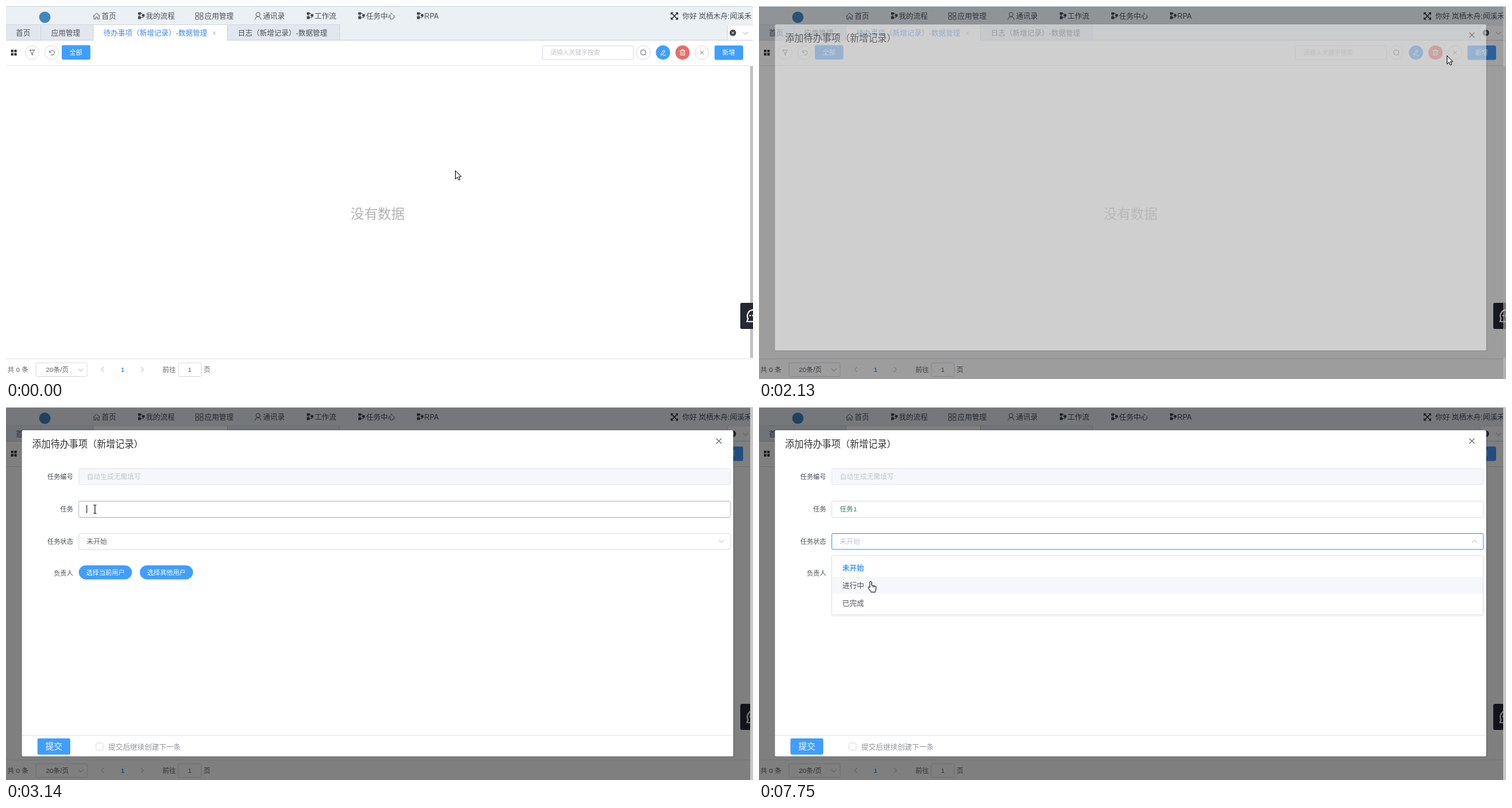
Recreate the animation shown at these times as an HTML page. Size 1058 px wide and 529 px high, loop 8 s.

```html
<!DOCTYPE html>
<html lang="zh-CN">
<head>
<meta charset="utf-8">
<title>待办事项</title>
<style>
html, body { margin: 0; width: 100%; height: 100%; overflow: hidden; background: #fff }
svg { display: block; width: 100%; height: 100% }
text { font: 10.25px "Liberation Sans", "Noto Sans CJK SC", "Noto Sans CJK", sans-serif; fill: #4a4f58; white-space: pre }
.s9 text { font-size: 9.1px }
.s95 text { font-size: 9.55px; fill: #606266 }
.line { fill: none; stroke: #606266; stroke-width: .9 }
.box { fill: #fff; stroke: #dcdfe6 }
.blue { fill: #409eff }
text.white { fill: #fff }
text.pale { fill: #c0c4cc }
.end { text-anchor: end }
</style>
</head>
<body>
<svg viewBox="0 0 1058 529">
<defs>
  <g id="flow" fill="#40454e">
    <path d="M0 9h4v3.4H0zM0 14.4h4v4H0zM5.5 11.5h3.8v3.6H5.5z"/>
    <path class="line" d="M2 11v5M4 10.5h2M4 16.500h3.500v-2"/>
  </g>
  <path id="cross" class="line" d="M-3.200-3.200 3.200 3.200M3.200-3.200-3.200 3.200"/>
  <path id="down" fill="none" stroke="#a8abb2" stroke-width=".9" d="M-3.500-1.700 0 1.700 3.500-1.700"/>
  <g id="arrow"><path d="M.5.500v11.800l2.700-2.500 1.900 4.100 2-.9-1.900-4h3.600z" fill="#fff" stroke="#000" stroke-width=".9"/></g>
  <g id="beam"><path d="M-2-6h1.500l.5.600.5-.6H2M0-5.400V5.400M-2 6h1.500L0 5.400l.5.600H2" fill="none" stroke="#000"/></g>
  <g id="hand"><path d="M-1 1Q.3-.8 1.600 1v5l5 1q1.600.5 1.300 2.500l-1.200 6H.8L-3.400 9.500q0-2 1.500-1.200l.9.900z" fill="#fff" stroke="#000" stroke-width=".9"/><path d="M3.700 6.500v2.500M5.800 7v2" stroke="#000" stroke-width=".7"/></g>
</defs>

<!-- header -->
<path d="M0 0h1058v49H0z" fill="#ebf0f5"/>
<path d="M0 .5h1058M0 26.500h473" stroke="#d5dbe2"/>
<circle cx="55" cy="16" r="8" fill="#3f87bd"/>
<path class="line" d="M123.500 14.500 128.300 10l4.800 4.500M124.700 13.500v5.200h2.300v-3h2.600v3h2.300v-5.200"/>
<use href="#flow" x="187"/><use href="#flow" x="426"/><use href="#flow" x="499"/><use href="#flow" x="582"/>
<path class="line" d="M268.700 9.700h4v4h-4zM274.900 9.700h4v4h-4zM268.700 15h4v4h-4zM274.900 15h4v4h-4z" stroke-linejoin="round"/>
<g class="line"><circle cx="357" cy="12" r="2.900"/><path d="M352.500 19.500q.5-4 4.500-4.600 4 .6 4.500 4.600"/></g>
<text x="135.500" y="18">首页</text>
<text x="198" y="18">我的流程</text>
<text x="281.300" y="18">应用管理</text>
<text x="364" y="18">通讯录</text>
<text x="437" y="18">工作流</text>
<text x="510" y="18">任务中心</text>
<text x="592.500" y="18">RPA</text>
<path d="M942.500 10l8.500 8.500m0-8.500-8.500 8.500" stroke="#303133" stroke-width="1.300"/>
<path d="M941.500 9h4l-4 4zM952 9h-4l4 4zM941.500 19.500h4l-4-4zM952 19.500h-4l4-4z" fill="#303133"/>
<text x="958" y="17.500">你好 岚栖木舟:闻溪禾</text>

<!-- tabs -->
<path d="M0 27h472v21H0z" fill="#e2e7ef"/>
<path d="M0 48.500h1058M49.500 27v21M123.500 27v21M313.500 27v21M472.500 27v21" stroke="#d0d7e0"/>
<path d="M124 27h189v22H124zM1021 28h37v20h-37z" fill="#fff"/>
<path d="M1021.500 28v20" stroke="#d0d7e0"/>
<text x="14" y="42">首页</text>
<text x="64" y="42">应用管理</text>
<text x="138" y="42" style="fill:#3b86f0">待办事项（新增记录）-数据管理</text>
<text x="328.500" y="42">日志（新增记录）-数据管理</text>
<use href="#cross" transform="translate(295 38.500) scale(.7)" opacity=".7"/>
<circle cx="1029.500" cy="38" r="4.600" fill="#40454e"/>
<path d="M1028 36.500l3 3m0-3-3 3" stroke="#fff"/>
<use href="#down" x="1047.500" y="38.500"/>

<!-- toolbar -->
<path d="M0 49h1058v480H0z" fill="#fff"/>
<path d="M0 84.500h1054M0 500.500h1058" stroke="#e4e7ed"/>
<path d="M7 62h3.500v3.500H7zM11.700 62h3.500v3.500h-3.500zM7 66.700h3.500v3.500H7zM11.700 66.700h3.500v3.500h-3.500z" fill="#303133"/>
<g class="box">
  <circle cx="37" cy="66" r="9.800"/><circle cx="64.700" cy="66" r="9.800"/>
  <circle cx="902.700" cy="66" r="9.800"/><circle cx="985.700" cy="66" r="9.800"/>
  <rect x="759.500" y="56.500" width="129" height="19.500" rx="2"/>
</g>
<path class="line" d="M33.500 62.500h7l-2.700 3.700v3.500l-1.600-1v-2.500zM61.800 63.500v2.300h2.300M62 65.500a3.300 3.300 0 1 1 1.200 3.300M905.200 68.500l1.200 1.200"/>
<circle class="line" cx="902.500" cy="65.800" r="3.700"/>
<use href="#cross" transform="translate(985.700 66) scale(.8)"/>
<circle class="blue" cx="930.500" cy="66" r="10.200"/>
<circle cx="958.200" cy="66" r="10.200" fill="#ea6c68"/>
<path d="M928 67.500l3.500-5 1.800 1.300-3.400 4.900-2.200.8zM930.500 69.800h4M954.300 63.500h7.800M955.300 63.500v6h5.800v-6M956.800 63.500v-1.500h2.800v1.500M957.200 65.500v2.500M959.200 65.500v2.500" fill="none" stroke="#fff" stroke-width=".9"/>
<rect class="blue" x="79" y="55.500" width="40.500" height="20.500" rx="2"/>
<rect id="add" x="1003.500" y="56" width="40.500" height="20.500" rx="2"/>
<g class="s9">
  <text class="white" x="90" y="69">全部</text>
  <text class="white" x="1014.500" y="69.400">新增</text>
  <text class="pale" x="771" y="69.200" style="font-size:8.800px">请输入关键字搜索</text>
</g>
<text x="488" y="301.500" style="font-size:19.200px;fill:#b2b2b2">没有数据</text>
<path d="M1054 85h4v414h-4z" fill="#c1c1c1"/>

<!-- pagination -->
<g class="box">
  <rect x="42.500" y="506" width="72.500" height="19.500" rx="2"/>
  <rect x="244" y="506" width="32.500" height="19.500" rx="2"/>
</g>
<g class="s95">
  <text x="2" y="519">共 0 条</text>
  <text x="56.500" y="519">20条/页</text>
  <text x="162.500" y="519" style="fill:#409eff;font-weight:bold">1</text>
  <text x="221.500" y="519.300">前往</text>
  <text x="257.500" y="519.300">1</text>
  <text x="280" y="519.300">页</text>
</g>
<use href="#down" x="106" y="516"/>
<use href="#down" transform="translate(137 515.500) rotate(90)"/>
<use href="#down" transform="translate(193 515.500) rotate(-90)"/>

<!-- chat button -->
<path d="M1058 421h-16q-2 0-2 2v33q0 2 2 2h16z" fill="#262833"/>
<path d="M1058 431a8.500 8.500 0 0 0-7 12.500l-1.500 4 8.500.2" fill="none" stroke="#fff" stroke-width="1.800"/>
<circle cx="1054" cy="439" r="1.200" fill="#fff"/><circle cx="1057.800" cy="439" r="1.200" fill="#fff"/>

<rect id="mask" y="1" width="1058" height="528"/>
<path id="strip" d="M1054 1h4v528h-4z" fill="#c8c8c8"/>

<g id="dialog">
  <rect x="21.500" y="32.500" width="1010" height="464.500" rx="2" opacity=".12"/>
  <rect x="22.500" y="33" width="1007.500" height="462.500" rx="1.500" fill="#fff"/>
  <text x="37" y="57" style="font-size:13.100px;fill:#303133">添加待办事项（新增记录）</text>
  <use href="#cross" transform="translate(1009.700 48.300) scale(1.150)"/>
  <circle id="spinner" cx="526.500" cy="280" r="12.300" fill="none" stroke="#409eff" stroke-width="1.300" stroke-linecap="round"/>
  <g id="form">
    <g class="s9 end">
      <text x="95" y="101.700">任务编号</text>
      <text x="95" y="147.500">任务</text>
      <text x="95" y="193.500">任务状态</text>
      <text x="95" y="239">负责人</text>
    </g>
    <g class="box">
      <rect x="103" y="87.500" width="923" height="22.500" rx="2" style="fill:#f5f7fa;stroke:#e4e7ed"/>
      <rect id="taskBox" x="103" y="133.500" width="923" height="23" rx="2"/>
      <rect id="stateBox" x="103" y="179.500" width="923" height="22.500" rx="2"/>
      <rect x="127.500" y="476.500" width="10" height="10" rx="1"/>
    </g>
    <g class="s95">
      <text class="pale" x="114.500" y="102">自动生成无需填写</text>
      <text id="task" x="114.300" y="148"/>
      <text id="state" x="114.300" y="194">未开始</text>
    </g>
    <path id="caret" d="M0 139v11.500" stroke="#303133"/>
    <use id="chevron" href="#down"/>
    <g class="blue">
      <rect x="103" y="224.500" width="75.500" height="20" rx="10"/>
      <rect x="189.500" y="224.500" width="75.500" height="20" rx="10"/>
      <rect x="44.500" y="470" width="46.500" height="23" rx="2"/>
    </g>
    <g class="s9">
      <text class="white" x="113.500" y="237.700">选择当前用户</text>
      <text class="white" x="200" y="237.700">选择其他用户</text>
      <text class="white" x="55.800" y="486.200" style="font-size:12px">提交</text>
    </g>
    <path d="M23 465.500h1007" stroke="#e4e7ed"/>
    <text x="145" y="485.500" style="fill:#909399">提交后继续创建下一条</text>
    <g id="menu">
      <rect x="102" y="210" width="925" height="87" rx="3" opacity=".05"/>
      <rect x="103" y="210.500" width="922.500" height="84" rx="2" class="box" style="stroke:#e4e7ed"/>
      <rect id="hover" x="103.500" width="921.500" height="24.800" fill="#f5f7fa"/>
      <text x="118" y="232" style="fill:#409eff;font-weight:bold">未开始</text>
      <text x="118" y="256.800">进行中</text>
      <text x="118" y="281.700">已完成</text>
    </g>
    <g id="ime">
      <rect id="imeBox" class="box" x="116.500" y="157.500" height="33"/>
      <text id="pinyin" x="120" y="169.500"/>
      <text id="words" x="120" y="186" style="font-size:13.500px"/>
    </g>
  </g>
</g>
<use id="cursor"/>
</svg>
<script>
const LOOP = 8000, STEP = 78;
const path = [ // time, x, y
  [110, 636, 233], [330, 622, 230], [650, 622, 230], [1480, 1015, 79], [1570, 1018, 66], [1650, 1018, 68],
  [1900, 1018, 68], [1970, 997, 73], [2055, 997, 73], [2208, 950, 67], [2750, 76, 127], [2985, 126, 145],
  [6500, 126, 145], [6960, 166, 187], [7200, 166, 187], [7745, 158, 247]
];
const cursors = [[0, 'arrow'], [1540, 'hand'], [1950, 'arrow'], [2850, 'beam'], [6640, 'arrow'], [6800, 'hand']];
const taskBorder = [[0, '#dcdfe6'], [2900, '#b4bccc'], [3210, '#409eff'], [7100, '#dcdfe6']];
const stateBorder = [[0, '#dcdfe6'], [6800, '#c0c4cc'], [7100, '#409eff']];
const typing = [ // time, text, right edge and words of the candidate list
  [0, ''],
  [3680, 'r', 465, '人 如 让 日 入 任 认 热'],
  [3750, 're', 465, '热 人 任 认 惹 仍 忍 仁'],
  [3980, 'reb', 577, '热播 热爆 热拔 人本 人邦 任办 认不 热表'],
  [4380, 're', 488, '热 人 任 认 惹 仍 忍 仁'],
  [4630, 'r', 488, '人 如 让 日 入 任 认 热'],
  [4720, 'ren', 465, '人 任 认 仁 忍 仍 刃 韧'],
  [4860, 'renw', 587, '任务 人物 认为 人为 人文 任务是 人物的'],
  [5080, 'renwu', 523, '任务 人物 人无 认无 任务是 人物的'],
  [5310, '任务'],
  [6020, '任务1']
];

const $ = id => document.getElementById(id);
const set = (id, attrs) => { for (const k in attrs) $(id).setAttribute(k, attrs[k]); };
const show = (id, on) => set(id, { visibility: on ? 'inherit' : 'hidden' });
const clamp = x => Math.min(1, Math.max(0, x));
const at = (list, t) => list.findLast(e => e[0] <= t) || list[0];

// CSS "ease": cubic-bezier(.25, .1, .25, 1)
function ease(x) {
  if (x <= 0 || x >= 1) return clamp(x);
  let lo = 0, hi = 1;
  for (let i = 0; i < 20; i++) {
    const s = (lo + hi) / 2;
    if (.75 * s * (1 - s) + s ** 3 < x) lo = s; else hi = s;
  }
  return .3 * lo * (1 - lo) ** 2 + 3 * lo * lo * (1 - lo) + lo ** 3;
}

function position(t) {
  const i = path.findIndex(p => p[0] > t);
  if (i < 1) return (i ? path[path.length - 1] : path[0]).slice(1);
  const [t0, x0, y0] = path[i - 1], [t1, x1, y1] = path[i];
  const u = (t - t0) / (t1 - t0), e = u * u * (3 - 2 * u);
  return [Math.round(x0 + (x1 - x0) * e), Math.round(y0 + (y1 - y0) * e)];
}

function drawDialog(q) {
  const p = ease((q - 2012) / 392);
  set('mask', { opacity: .5 * ease((q - 2005) / 267) });
  set('strip', { opacity: p });
  set('dialog', { opacity: p, transform: `translate(0 ${-14.6 * (1 - p)})` });
  show('form', q > 2520);
  show('spinner', q > 2200 && q < 2520);
  const wait = Math.max(0, q - 2208), arc = clamp(wait / 750) ** 2;
  set('spinner', {
    transform: `rotate(${45 + wait * .18} 526.5 280)`,
    'stroke-dasharray': `${1 + 55 * arc} 200`, 'stroke-dashoffset': -25 * arc
  });
}

function drawTask(t, q) {
  const [, text, right, words] = at(typing, t);
  set('taskBox', { style: 'stroke:' + at(taskBorder, q)[1] });
  $('task').textContent = text;
  $('task').style.fill = right ? '#606266' : '#2e8465';
  $('task').style.textDecoration = right ? 'underline' : 'none';
  const end = text ? $('task').getComputedTextLength() : 0;
  set('caret', { transform: `translate(${Math.floor(114.3 + end) + .5} 0)` });
  show('caret', t >= 3130 && t < 5850 || t >= 6020 && t < 6550);
  show('ime', right);
  if (!right) return;
  set('imeBox', { width: right - 117 });
  $('pinyin').textContent = text;
  $('words').textContent = words.split(' ').map((w, i) => `${i + 1}.${w}`).join('　');
}

function drawMenu(q, y) {
  const open = q > 7100, p = ease((q - 7060) / 392);
  set('stateBox', { style: 'stroke:' + at(stateBorder, q)[1] });
  $('state').style.fill = open ? '#c0c4cc' : '#606266';
  set('chevron', { transform: `translate(1013.500 190.500) rotate(${180 * p})` });
  show('menu', open);
  set('menu', { opacity: p, transform: `translate(0 ${206 * (1 - p)}) scale(1 ${p})` });
  set('hover', { y: y > 240 ? 240.5 : 215.7 });
}

function draw(now) {
  const t = now % LOOP;
  const q = Math.floor((t - 160) / STEP) * STEP + 180;
  const [x, y] = position(q);
  set('add', { fill: q > 1540 && q < 2120 ? '#66b1ff' : '#409eff' });
  drawDialog(q);
  drawTask(t, q);
  drawMenu(q, y);
  set('cursor', { href: '#' + at(cursors, q)[1], x, y });
  requestAnimationFrame(draw);
}
requestAnimationFrame(draw);
</script>
</body>
</html>
```
